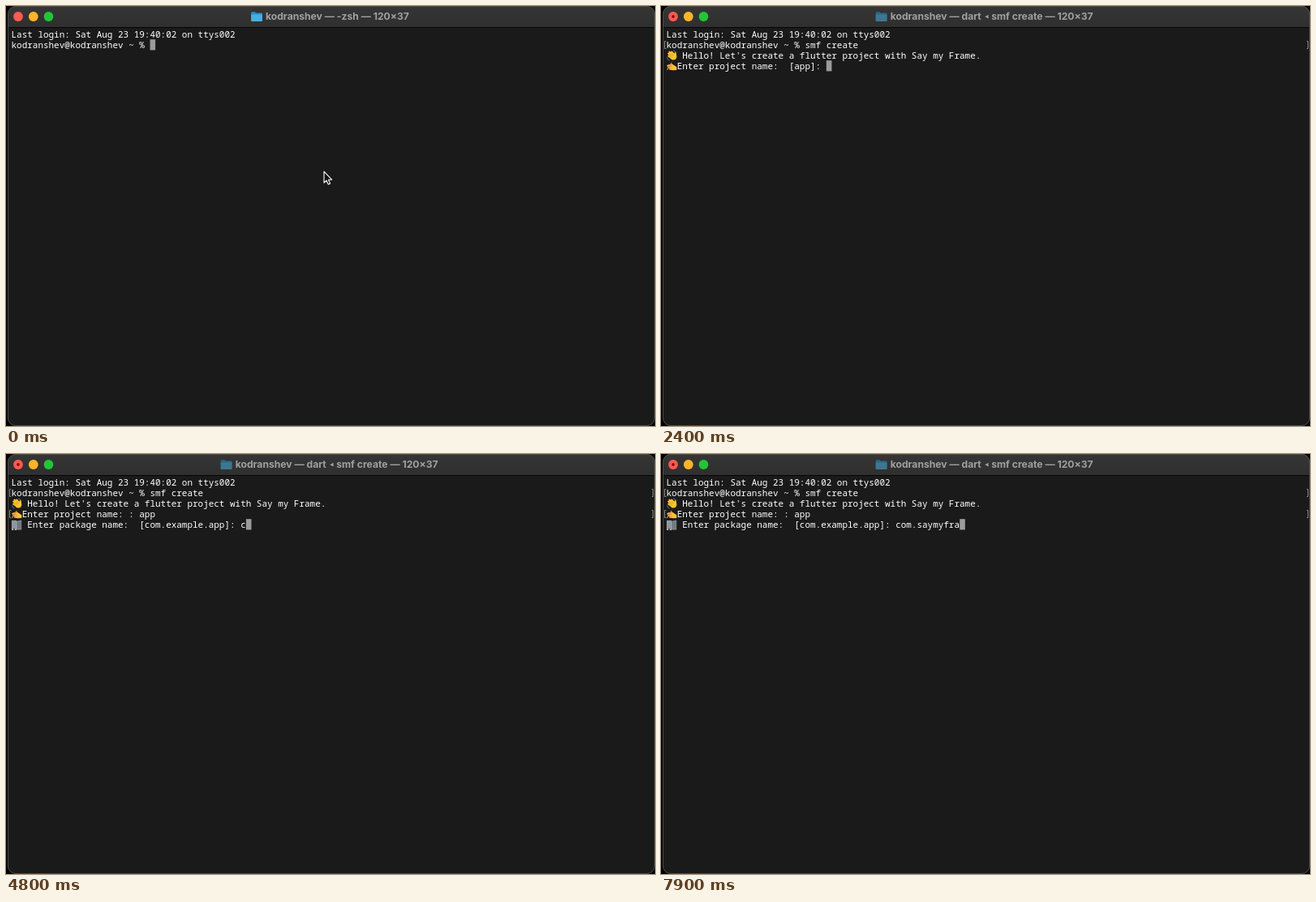
An HTML page that plays this animation: 800 by 518 pixels, repeating every 8 s.

```html
<!DOCTYPE html>
<html lang="en">
<head>
<meta charset="utf-8">
<title>Terminal</title>
<style>
  html, body { margin: 0; width: 100%; height: 100%; overflow: hidden; background: #000; }
  svg { display: block; width: 100vw; height: 100vh; }
  text { white-space: pre; }
  .row { font: 500 10.96px "Noto Sans Mono", "DejaVu Sans Mono", monospace; fill: #fff; }
  .title { font: 700 12.15px Inter, "Liberation Sans", sans-serif; fill: #a0a0a0; }
</style>
</head>
<body>
<svg viewBox="0 0 800 518">
  <defs>
    <linearGradient id="bar" x2="0" y2="1">
      <stop stop-color="#353535"/><stop offset="1" stop-color="#2f2f2f"/>
    </linearGradient>
    <clipPath id="window"><rect x="2" y="0" width="798" height="518" rx="10"/></clipPath>
  </defs>
  <rect width="800" height="518" fill="#000"/>
  <g clip-path="url(#window)">
    <rect width="800" height="518" fill="#1a1a1a"/>
    <rect width="800" height="26" fill="url(#bar)"/>
    <rect y="26" width="800" height="1" fill="#050505"/>
  </g>
  <rect x="2.5" y=".5" width="797" height="517" rx="9.5" fill="none" stroke="#4c4c4c"/>

  <circle cx="15" cy="13" r="5.9" fill="#ff5b52"/>
  <circle id="busyDot" cx="15" cy="13" r="1.9" fill="#8a1009"/>
  <circle cx="33.8" cy="13" r="5.9" fill="#ffb429"/>
  <circle cx="52.5" cy="13" r="5.9" fill="#22c538"/>

  <g id="folder">
    <path d="M0 1.2Q0 0 1.2 0H4.6L6 1.4H12.6Q13.8 1.4 13.8 2.6V10.5Q13.8 11.7 12.6 11.7H1.2Q0 11.7 0 10.5Z" fill="#2690c6"/>
    <path d="M0 3.2H13.8V10.5Q13.8 11.7 12.6 11.7H1.2Q0 11.7 0 10.5Z" fill="#45b0e4"/>
  </g>
  <text id="titleShell" class="title" x="320" y="17.3"></text>
  <g id="titleBusy">
    <text id="titleUser" class="title" x="282.7" y="17.3"></text>
    <path d="M403.6 10.8V15.6L399.3 13.2Z" fill="#a0a0a0"/>
    <text class="title" x="407.2" y="17.3">smf create — 120×37</text>
  </g>

  <rect id="caret" width="6.6" height="13.2" fill="#9b9b9b"/>
  <g id="rows"></g>

  <g id="greeting" fill="none" stroke-linecap="round">
    <g stroke="#ffc52e" stroke-width="2.2">
      <path d="M9.3 58.6L14.5 63M10.5 56.7L15.5 61.5M13.2 56.6L17 61M17.6 58.2L18.3 63M9.3 61.6L14 65"/>
    </g>
    <ellipse cx="15.4" cy="63" rx="3.5" ry="3.5" fill="#ffc52e"/>
    <path d="M10.6 58.9L14 61.8M12.7 57.8L15.6 60.9M10 61L13 63.3" stroke="#c47c18" stroke-width=".6"/>
    <path d="M15.5 55.2Q18 55.5 18.8 57.2M7.5 63.8Q8 66.3 10.2 67" stroke="#4ba6d8" stroke-width=".8"/>
  </g>
  <g id="writing" fill="none" stroke-linecap="round">
    <path d="M10 73.5Q12 70.5 14.5 72L19.3 75.2V79L15 79.2Q10.5 79 10 76Z" fill="#ffc52e"/>
    <path d="M8.2 73.7L13 72.5M9 75.7H13.8M11 77.7L14 77.5" stroke="#ffc52e" stroke-width="1.9"/>
    <path d="M9.8 74.8L13.5 74.2M10.6 76.8H14" stroke="#b87416" stroke-width=".6"/>
    <path d="M7.7 78.6L13 70.2" stroke="#d6873b" stroke-width="1.1"/>
  </g>
  <g id="building">
    <path d="M7 82H13V94H7Z" fill="#a5adb2"/>
    <path d="M13 82.7L19.2 81.6V93.5H13Z" fill="#7e888e"/>
    <path d="M8.3 83V92M10 83V92M11.7 83V92M14.7 84V92M16.3 84V92M17.9 84V92" stroke="#566168" stroke-width=".8" stroke-dasharray="1.3 .8"/>
    <path d="M9 91.7H11V94H9Z" fill="#454e53"/>
  </g>

  <g fill="none" stroke="#8c8c8c">
    <path id="mark1" d="M6.3 43.5H4.5V52.5H6.3M796 43.5H797.6V52.5H796"/>
    <path id="mark3" d="M6.3 69.5H4.5V78.5H6.3M796 69.5H797.6V78.5H796"/>
  </g>
  <path id="pointer" d="M392 204.2V218L395.1 215.2L397.3 220L399.6 219L397.5 214.2H401.6Z" fill="#111" stroke="#fff" stroke-width="1.1" stroke-linejoin="round"/>
</svg>
<script>
const LOOP = 8000, LEFT = 6.55, CELL = 6.576, PITCH = 13;
const USER = "kodranshev";
const PROMPT = `${USER}@${USER} ~ % `;
const PACKAGE = "   Enter package name:  [com.example.app]: ";
const COMMAND = { text: "smf create", times: [100, 200, 400, 600, 900, 1200, 1500, 1600, 1800, 1900] };
const ANSWER = { text: "com.saymyfra", times: [4800, 4900, 5200, 5500, 6200, 6300, 6600, 6900, 7100, 7600, 7800, 7900] };
const AT = { pointerOff: 100, run: 2100, busy: 2200, greet: 2400, hide: 2800, unhide: 3200, confirm: 3700, next: 3800 };

const el = id => document.getElementById(id);
const show = (id, on) => el(id).setAttribute("visibility", on ? "visible" : "hidden");
const typed = ({ text, times }, t) => text.slice(0, times.filter(at => at <= t).length);

const rows = Array.from({ length: 5 }, (_, i) => {
  const row = document.createElementNS("http://www.w3.org/2000/svg", "text");
  row.setAttribute("class", "row");
  row.setAttribute("x", LEFT);
  row.setAttribute("y", 38.6 + i * PITCH);
  return el("rows").appendChild(row);
});
el("titleShell").textContent = `${USER} — -zsh — 120×37`;
el("titleUser").textContent = `${USER} — dart`;

function screenText(t) {
  const lines = ["Last login: Sat Aug 23 19:40:02 on ttys002", PROMPT + typed(COMMAND, t)];
  if (t >= AT.run) lines.push("");
  if (t >= AT.greet) {
    lines[2] = "   Hello! Let's create a flutter project with Say my Frame.";
    lines.push(t < AT.next ? "  Enter project name:  [app]: " : "  Enter project name: : app");
  }
  if (t >= AT.confirm) lines.push(t < AT.next ? "" : PACKAGE + typed(ANSWER, t));
  return lines;
}

function render(t) {
  const lines = screenText(t);
  rows.forEach((row, i) => {
    const text = lines[i] || "";
    if (row.textContent !== text) row.textContent = text;
  });

  const last = lines.length - 1;
  el("caret").setAttribute("x", LEFT + lines[last].length * CELL);
  el("caret").setAttribute("y", 28.2 + last * PITCH);
  show("caret", t < AT.hide || t >= AT.unhide);

  const busy = t >= AT.busy;
  show("busyDot", busy);
  show("titleBusy", busy);
  show("titleShell", !busy);
  el("folder").setAttribute("transform", `translate(${busy ? 264.7 : 302.2} 7.2)`);
  el("folder").setAttribute("opacity", busy ? 0.55 : 1);

  show("greeting", t >= AT.greet);
  show("writing", t >= AT.greet);
  show("building", t >= AT.next);
  show("mark1", t >= AT.run);
  show("mark3", t >= AT.confirm);
  show("pointer", t < AT.pointerOff);
}

const start = performance.now();
function tick() {
  render((performance.now() - start) % LOOP);
  requestAnimationFrame(tick);
}
tick();
</script>
</body>
</html>
```
